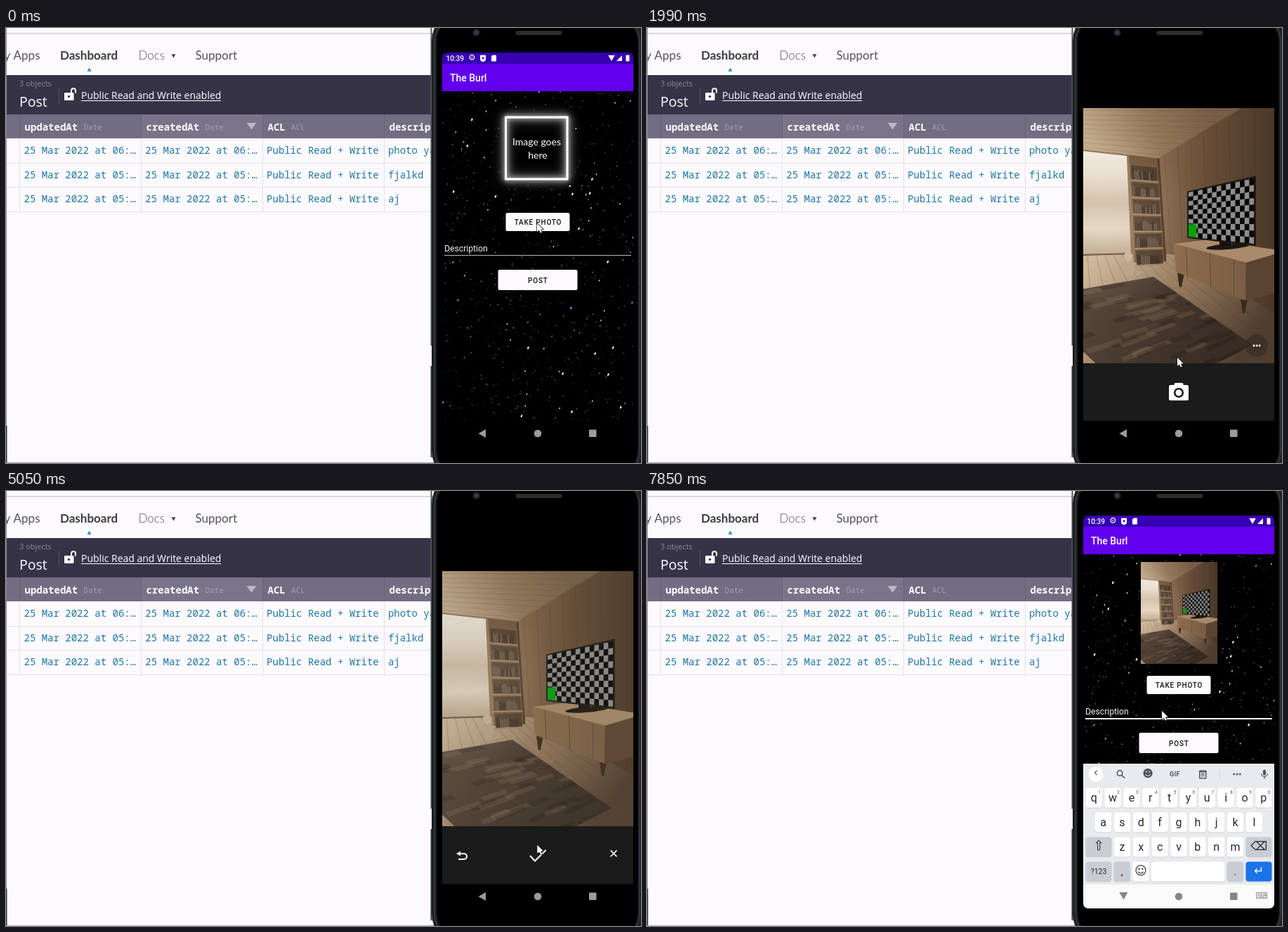
Recreate the animation shown at these times as an HTML page with a canvas. Size 904x619 px, loop 8 s.

```html
<!DOCTYPE html>
<html lang="en">
<head>
<meta charset="utf-8">
<title>Photo post demo</title>
<style>
html, body { margin: 0; width: 100%; height: 100%; overflow: hidden; background: #fcfafc; }
canvas { display: block; }
</style>
</head>
<body>
<canvas id="stage" width="904" height="619"></canvas>
<script>
const W = 904, H = 619, LOOP = 8000, STEP = 145;
const LATO = 'Lato, sans-serif', OPEN = '"Open Sans", sans-serif';
const MONO = '"Noto Sans Mono", monospace', ROBOTO = 'Roboto, sans-serif';
const stage = document.getElementById('stage').getContext('2d');
stage.imageSmoothingQuality = 'high';
let g = stage;

const clamp = p => Math.max(0, Math.min(1, p));
const ramp = (t, a, b) => clamp((t - a) / (b - a));
const easeOut = p => p * (2 - p);
const lerp = (a, b, p) => a + (b - a) * p;
const repeat = (n, fn) => { for (let i = 0; i < n; i++) fn(i); };
function random(seed) {
  return () => (seed = (seed * 16807) % 2147483647) / 2147483647;
}

// ---- drawing helpers (all draw into g) ----
function paint(w, h, draw) {
  const c = document.createElement('canvas');
  c.width = w; c.height = h;
  const prev = g;
  g = c.getContext('2d');
  draw();
  g = prev;
  return c;
}
function text(s, x, y, font, color, align = 'left', spacing = 0) {
  g.font = font; g.fillStyle = color; g.textAlign = align;
  g.letterSpacing = spacing + 'px';
  g.fillText(s, x, y);
}
function glyph(s, x, y, size, color) {
  g.textBaseline = 'middle';
  text(s, x, y, size + 'px "DejaVu Sans", sans-serif', color, 'center');
  g.textBaseline = 'alphabetic';
}
function rect(x, y, w, h, color) { g.fillStyle = color; g.fillRect(x, y, w, h); }
function box(x, y, w, h, r, color) {
  g.beginPath(); g.roundRect(x, y, w, h, r);
  g.fillStyle = color; g.fill();
}
function trace(pts) {
  g.beginPath();
  for (let i = 0; i < pts.length; i += 2) g.lineTo(pts[i], pts[i + 1]);
}
function poly(color, ...pts) { trace(pts); g.closePath(); g.fillStyle = color; g.fill(); }
function line(color, width, ...pts) {
  trace(pts); g.strokeStyle = color; g.lineWidth = width; g.stroke();
}
function oval(x, y, rx, ry, turn, color) {
  g.beginPath(); g.ellipse(x, y, rx, ry, turn, 0, 7);
  g.fillStyle = color; g.fill();
}
const dot = (x, y, r, color) => oval(x, y, r, r, 0, color);
const dots = (x, y, gap, r, color) => repeat(3, i => dot(x + (i - 1) * gap, y, r, color));
function ring(x, y, r, color, width, a = 0, b = 7) {
  g.beginPath(); g.arc(x, y, r, a, b);
  g.strokeStyle = color; g.lineWidth = width; g.stroke();
}
function tri(x, y, r, turn, color) {
  const pts = [];
  repeat(3, i => pts.push(x + r * Math.cos(turn + i * 2.094), y + r * Math.sin(turn + i * 2.094)));
  poly(color, ...pts);
}
function fade(x0, y0, x1, y1, ...colors) {
  const f = g.createLinearGradient(x0, y0, x1, y1);
  colors.forEach((c, i) => f.addColorStop(i / (colors.length - 1), c));
  return f;
}

// ---- dashboard page and phone body ----
const backdrop = paint(W, H, () => {
  rect(0, 0, W, H, '#fcfafc');
  rect(0, 7, W, 1.5, '#d2d0d3');
  text('My Apps', 48.5, 45, '17px ' + LATO, '#55535c', 'right');
  text('Dashboard', 77, 45, 'bold 17px ' + LATO, '#3c3a44');
  text('Docs', 188.5, 45, '300 17px ' + LATO, '#55535c');
  text('Support', 269.5, 45, '17px ' + LATO, '#55535c');
  tri(238.5, 39, 3.5, Math.PI / 2, '#44424c');
  tri(118.5, 60, 3.5, -Math.PI / 2, '#2a8fd0');

  rect(1, 67, W, 56, '#363347');
  text('3 objects', 19, 83, '11px ' + OPEN, '#8b8997');
  text('Post', 19, 112, '19.5px ' + OPEN, '#fff');
  rect(75, 85, 1, 23, '#56536a');
  box(83, 92, 13.5, 11, 1, '#fff');
  dot(89.5, 97.5, 1.7, '#363347');
  ring(96, 89, 3, '#fff', 2, Math.PI, 0);
  rect(92, 88.5, 2, 4, '#fff');
  rect(98, 88.5, 2, 4, '#fff');
  text('Public Read and Write enabled', 107, 101, '14px ' + OPEN, '#fff');
  rect(107, 103, 199, 1, '#fff');

  const names = ['updatedAt', 'createdAt', 'ACL', 'description'];
  const types = ['Date', 'Date', 'ACL', ''];
  const rows = [['06', 'photo yay'], ['05', 'fjalkd'], ['05', 'aj']];
  rect(1, 123, W, 34, '#726d83');
  rect(192, 123, 173, 34, '#797489');
  repeat(4, c => {
    const x = 26.5 + c * 173;
    rect(x - 7.5, 123, 1, 34, '#67627a');
    rect(x - 7.5, 157, 1, 104, '#e4e1e6');
    text(names[c], x, 145.5, '600 14px ' + MONO, '#fff');
    text(types[c], x + (names[c].length + 1) * 8.4, 144.5, '11px ' + MONO, '#a29eaf');
  });
  poly('#bab6c2', 342.5, 135, 356.5, 135, 349.5, 144.5);
  rows.forEach(([hour, note], i) => {
    const y = 179 + i * 34.5, stamp = `25 Mar 2022 at ${hour}:…`;
    [stamp, stamp, 'Public Read + Write', note].forEach((s, c) =>
      text(s, 25.5 + c * 172.8, y, '14px ' + MONO, '#1f76a8'));
    rect(1, Math.round(y + 12.5), W, 1, '#e4e1e6');
  });
  rect(0, 0, 1, H, '#8d8b90');
  rect(0, 566, 1.5, 53, '#2c3c50');
  rect(0, 618, W, 1, '#a9a5ad');

  rect(604.5, 0, 2, 452, '#55585b');
  rect(604.5, 481, 2, 130, '#3b3e41');
  box(606, -24, 302, 668, 42, '#1c1f21');
  g.beginPath(); g.roundRect(610, -20, 292, 660, 39);
  g.strokeStyle = '#30363a'; g.lineWidth = 2; g.stroke();
  box(613, -17, 286.5, 654, 37, '#000');
  dot(669.5, 6.5, 5, '#26272b');
  dot(669.5, 6.5, 2.5, '#3b3a56');
  box(725.5, 4, 66, 6, 3, '#2d2d2e');
});

// ---- star field behind the app: few bright stars, many faint ones ----
const stars = paint(272, 470, () => {
  const rnd = random(4711);
  rect(0, 0, 272, 470, '#000');
  repeat(850, i => {
    const r = i < 20 ? 1.6 : i < 65 ? 1 : .3 + rnd() * .5;
    const v = i < 65 ? 230 : 70 + rnd() * 150;
    const tint = rnd() < .1 ? .55 : 1;
    oval(rnd() * 272, rnd() * 470, r * .75, r * 1.25, .45, `rgb(${v * tint},${v * tint},${v + 12})`);
  });
});

// ---- room seen by the camera, in screen coordinates ----
// A plane is its four corners clockwise; u and v run across it from 0 to 1.
const on = (q, u, v) =>
  [0, 1].map(k => lerp(lerp(q[k], q[2 + k], u), lerp(q[6 + k], q[4 + k], u), v));
function patch(q, color, u0 = 0, v0 = 0, u1 = 1, v1 = 1) {
  poly(color, ...on(q, u0, v0), ...on(q, u1, v0), ...on(q, u1, v1), ...on(q, u0, v1));
}
function seams(q, n, color, across) {
  repeat(n, i => {
    const p = (i + .5) / n;
    if (across) line(color, 1, ...on(q, 0, p), ...on(q, 1, p));
    else line(color, 1, ...on(q, p, 0), ...on(q, p, 1));
  });
}
const room = paint(272, 363, () => {
  const rnd = random(99);
  const ceiling = [621, 114, 846, 114, 728, 185, 621, 173];
  const wall = [728, 185, 893, 88, 893, 400, 738, 325];
  const floor = [621, 322, 755, 322, 1010, 477, 621, 477];
  const view = [621, 175, 683, 182, 689, 321, 621, 323];
  const shelf = [685, 181, 728, 186, 738, 332, 694, 334];
  const rug = [541, 385, 721, 354, 862, 451, 700, 535];
  const top = [800, 301, 910, 318, 853, 334, 750, 307];
  const front = [750, 307, 853, 334, 852, 388, 753, 347];
  const side = [853, 334, 893, 322, 893, 378, 852, 388];
  const tv = [771, 234, 864, 214, 864, 307, 771, 297];

  g.translate(-621, -114);
  rect(621, 114, 272, 363, fade(720, 0, 893, 0, '#8a6b4e', '#644b36', '#4b3828'));
  seams(wall, 9, 'rgba(50,34,22,.18)');
  patch(ceiling, fade(640, 185, 800, 114, '#c2aa8c', '#94795c', '#765d45'));
  seams(ceiling, 9, 'rgba(80,58,38,.18)', true);
  patch(floor, fade(640, 325, 840, 470, '#c9b194', '#94785c', '#4f3d2e'));
  seams(floor, 11, 'rgba(70,50,34,.3)');

  patch(view, fade(0, 175, 0, 322, '#f1eae0', '#e6dbcd', '#cbb9a3', '#e0d2c0', '#b9a48a'));
  line('#5a4532', 2, ...on(view, 0, 1), ...on(view, 1, 1));

  patch(shelf, '#6e5238');
  repeat(6, i => {
    const v = .09 + i * .16;
    patch(shelf, '#4a3727', .07, v, .93, v + .13);
    repeat(12, b => patch(shelf, rnd() < .5 ? '#35291f' : '#665040',
      .1 + b * .06, v + .03 + rnd() * .04, .15 + b * .06, v + .13));
    line('#a18262', 2, ...on(shelf, 0, v + .14), ...on(shelf, 1, v + .14));
  });
  line('#8d7052', 2.5, ...on(shelf, 0, 0), ...on(shelf, 0, 1));
  line('#4a3625', 3, ...on(shelf, 1, 0), ...on(shelf, 1, 1));

  patch(rug, fade(640, 360, 820, 470, '#58473a', '#44372d', '#382c23'));
  repeat(50, () => {
    const u = rnd(), v = rnd();
    patch(rug, rnd() < .5 ? 'rgba(150,126,102,.22)' : 'rgba(30,22,17,.25)',
      u, v, Math.min(1, u + .12 + rnd() * .2), Math.min(1, v + .04));
  });

  oval(687, 342, 7, 13, 0, '#b59f85');
  oval(685, 325, 6, 7, 0, '#c4b097');
  ring(695, 345, 7, '#b59f85', 2.5, 0, 1.6);

  [.06, .97].forEach(u => {
    const [x, y] = on(front, u, 1);
    poly('#3a2a1c', x - 4, y - 1, x + 6, y, x + 2, y + 19, x - 1, y + 19);
  });
  patch(top, '#a98a6a');
  patch(front, fade(750, 0, 853, 0, '#8d6d4c', '#7a5e44'));
  patch(side, '#5a4431');
  seams(front, 3, '#5f4833');

  oval(827, 311, 31, 4, -.08, '#1d1611');
  rect(815, 300, 16, 10, '#15110e');
  patch(tv, '#1c1712', -.02, -.03, 1.03, 1.03);
  patch(tv, '#070707');
  repeat(140, i => {
    const c = i % 14, r = Math.floor(i / 14);
    if ((c + r) % 2 === 0) patch(tv, '#8d8d8d', c / 14, r / 10, (c + 1) / 14, (r + 1) / 10);
  });
  patch(tv, '#00a20a', 0, .72, .12, 1);

  const glow = g.createRadialGradient(650, 270, 10, 650, 270, 130);
  glow.addColorStop(0, 'rgba(255,240,215,.2)');
  glow.addColorStop(1, 'rgba(255,240,215,0)');
  rect(621, 114, 272, 363, glow);
});

// ---- icons ----
function cameraIcon(x, y, scale, color, hole) {
  g.save();
  g.translate(x, y); g.scale(scale, scale);
  box(-14, -10, 28, 22, 2.5, color);
  box(-6.5, -13, 13, 6, 2, color);
  ring(0, 1, 5.8, hole, 2.6);
  g.restore();
}
function statusBar() {
  text('10:39', 626.5, 47, '500 10px ' + ROBOTO, '#fff');
  glyph('⚙', 663.5, 43, 12, '#fff');
  box(675, 38.5, 8, 9.5, [1, 1, 5, 5], '#fff');
  dot(679, 42.8, 1.5, '#3700b3');
  box(691, 38.5, 7, 9, [3, 1, 1, 1], '#fff');
  tri(862, 41.5, 5.5, Math.PI / 2, '#fff');
  poly('#fff', 869, 47, 877, 39, 877, 47);
  box(882.5, 38.5, 5, 9, 1, '#fff');
}
function navIcons(typing) {
  const color = typing ? '#858585' : '#9c9c9c';
  tri(typing ? 678.5 : 679.5, typing ? 574.5 : 577, 7, typing ? Math.PI / 2 : Math.PI, color);
  dot(757, 577, 5.3, color);
  box(830, 571.5, 10.5, 10.5, 1, color);
  if (typing) glyph('⌨', 875, 576.5, 12, color);
}
function cursor(x, y) {
  g.save();
  g.translate(x, y);
  trace([0, 0, 0, 12, 2.8, 9.4, 4.8, 13.6, 6.8, 12.7, 4.9, 8.7, 8.6, 8.5]);
  g.closePath();
  g.lineWidth = 1.4; g.strokeStyle = '#111'; g.stroke();
  g.fillStyle = '#fff'; g.fill();
  g.restore();
}

// ---- phone screens ----
function button(label, w, h, y) {
  box(757 - w / 2, y - h / 2, w, h, 2.5, '#fcfafc');
  text(label, 757.4, y + 4, '500 10px ' + ROBOTO, '#151515', 'center', .8);
}
function app(t) {
  g.drawImage(stars, 621, 90);
  rect(621, 35, 272, 16, '#3700b3');
  rect(621, 51, 272, 39, '#6200ee');
  text('The Burl', 632, 76, '500 14px ' + ROBOTO, '#fff');
  if (t > 5000) g.drawImage(room, 703, 101, 109, 145);
  else {
    rect(703, 118, 105, 106, '#000');
    g.save();
    g.shadowColor = '#fff'; g.strokeStyle = '#fff'; g.lineWidth = 2.5;
    repeat(3, i => { g.shadowBlur = 6 + i * 6; g.strokeRect(711.5, 127, 87.5, 88); });
    g.restore();
    text('Image goes', 755.5, 167, '14px ' + LATO, '#fff', 'center');
    text('here', 757, 186, '14px ' + LATO, '#fff', 'center');
  }
  button('TAKE PHOTO', 91, 26, 276);
  text('Description', 624, 318, '12.2px ' + ROBOTO, '#f4f4f4');
  const focused = t > 7100;
  rect(624, 323, 266, focused ? 2 : 1, focused ? '#fff' : '#b9b9b9');
  if (focused && t < 7800) rect(624.5, 305, 1.5, 18, '#03dac5');
  button('POST', 113, 29, 358.5);
}
function camera(t) {
  const cover = 1 - ramp(t, 960, 1240), review = ramp(t, 3400, 3720);
  rect(621, 35, 272, 524, '#000');
  g.drawImage(room, 621, 114);
  g.globalAlpha = cover;
  rect(621, 114, 272, 363, '#000');
  cameraIcon(757, 296, 1.25, '#8d8a86', '#222');
  g.globalAlpha = .14 * review;
  rect(621, 114, 272, 363, '#706858');
  g.globalAlpha = 1;
  rect(621, 477, 272, 82, '#1b1b1b');

  g.globalAlpha = (1 - .7 * cover) * (1 - review);
  cameraIcon(757, 518, 1, '#fff', '#1b1b1b');
  dot(868, 452, 16, 'rgba(45,38,34,.5)');
  dots(868, 452, 4, 1.4, '#fff');

  g.globalAlpha = review;
  tri(645, 516, 4, Math.PI, '#fff');
  line('#fff', 2, 644, 516, 652, 516);
  ring(652, 520, 4, '#fff', 2, -Math.PI / 2, Math.PI / 2);
  line('#fff', 2, 652, 524, 644, 524);
  line('#fff', 2.2, 746, 519, 753, 526.5, 768.5, 511);
  glyph('✕', 865, 518, 17, '#fff');
  g.globalAlpha = 1;
}
function keyboard() {
  const ink = '#26282c', soft = '#50545a', grey = '#c9ccd3';
  const key = (x, y, w, label = '', size = 16, fill = '#fff', color = ink) => {
    box(x - w / 2, y - 13, w, 28, 4, '#cfd1d6');
    box(x - w / 2, y - 14, w, 28, 4, fill);
    if (label.charCodeAt() < 256) text(label, x, y + size / 3, `${size}px ` + ROBOTO, color, 'center');
    else glyph(label, x, y, size, color);
  };
  rect(621, 388, 272, 172, '#e8eaee');
  rect(621, 560, 272, 35, '#fafafa');

  dot(639, 403, 10.5, '#fff');
  glyph('‹', 639, 402, 17, soft);
  ring(673, 401.5, 3.7, soft, 1.5);
  line(soft, 1.7, 676, 404.5, 680, 408.5);
  glyph('☻', 713, 403, 15, soft);
  text('GIF', 751.5, 406, 'bold 9px ' + ROBOTO, soft, 'center', .4);
  box(786, 397.5, 10.5, 12, 1, soft);
  rect(787.5, 400, 7.5, 8, '#e8eaee');
  repeat(3, i => rect(788.7, 401 + i * 2, 5, 1, soft));
  rect(815, 396, 1, 14, '#cfd2d7');
  dots(840, 403, 4.3, 1.4, soft);
  box(877, 396.5, 4, 8, 2, soft);
  ring(879, 402, 4.4, soft, 1.2, 0, Math.PI);
  rect(878.4, 406, 1.3, 3.5, soft);

  ['qwertyuiop', 'asdfghjkl', 'zxcvbnm'].forEach((letters, row) =>
    [...letters].forEach((c, i) => {
      const x = 757 + (i - (letters.length - 1) / 2) * 26.85, y = 436.5 + row * 35;
      key(x, y, 23.4, c);
      if (!row) text((i + 1) % 10, x + 8, y - 6, '6.5px ' + ROBOTO, soft, 'center');
    }));
  key(643, 506.5, 37, '⇧', 19, grey);
  key(871, 506.5, 37, '⌫', 17, grey);
  key(643, 541.5, 37, '?123', 10.5, grey);
  key(676.3, 541.5, 23.5, ',', 15, grey);
  key(703, 541.5, 23.5, '☺', 17);
  key(770, 541.5, 104.5);
  key(837.3, 541.5, 23.5, '.', 15, grey);
  key(871, 541.5, 37, '↵', 17, '#1a73e8', '#fff');
}

// ---- timeline ----
// Pointer glides: [start, end, x, y].
const glides = [[300, 1150, 749, 209], [1300, 2250, 756, 514], [3450, 4050, 740, 290],
  [4460, 5050, 757, 513], [5655, 6400, 752, 286], [6780, 7134, 733, 313]];
function pointer(t) {
  let x = 756, y = 278;
  for (const [start, end, tx, ty] of glides) {
    const p = easeOut(ramp(t, start, end));
    x = lerp(x, tx, p);
    y = lerp(y, ty, p);
  }
  cursor(x, y);
}
function zoomed(scale, draw) {
  g.save();
  g.translate(757, 312); g.scale(scale, scale); g.translate(-757, -312);
  draw();
  g.restore();
}
const layer = document.createElement('canvas');
layer.width = W; layer.height = H;
const layerCtx = layer.getContext('2d');

function draw(t) {
  g = stage;
  g.drawImage(backdrop, 0, 0);
  g.save();
  g.beginPath(); g.roundRect(621, 35, 272, 559, 7); g.clip();
  rect(621, 35, 272, 559, '#000');

  const closing = t > 5600;
  const open = easeOut(ramp(t, 100, 560)), close = ramp(t, 5590, 6115);
  const cameraAlpha = closing ? clamp(1 - 1.72 * close) : open;
  if (cameraAlpha < 1)
    zoomed(closing ? 1.1 - .1 * close : 1 + .06 * open, () => app(t));
  if (cameraAlpha > 0) {
    g = layerCtx;
    g.clearRect(0, 0, W, H);
    camera(t);
    g = stage;
    g.globalAlpha = cameraAlpha;
    zoomed(closing ? 1 - .1 * close : .85 + .15 * open, () => g.drawImage(layer, 0, 0));
    g.globalAlpha = 1;
  }
  if (open === 0 || close === 1) statusBar();

  const rise = easeOut(ramp(t, 7200, 7560));
  if (rise) {
    g.save();
    g.translate(0, 206 * (1 - rise));
    keyboard();
    g.restore();
  }
  navIcons(rise > .5);
  g.restore();
  pointer(t);
}
function tick() {
  const t = performance.now() % LOOP;
  draw(Math.floor((t + 20) / STEP) * STEP);
  requestAnimationFrame(tick);
}
tick();
</script>
</body>
</html>
```
